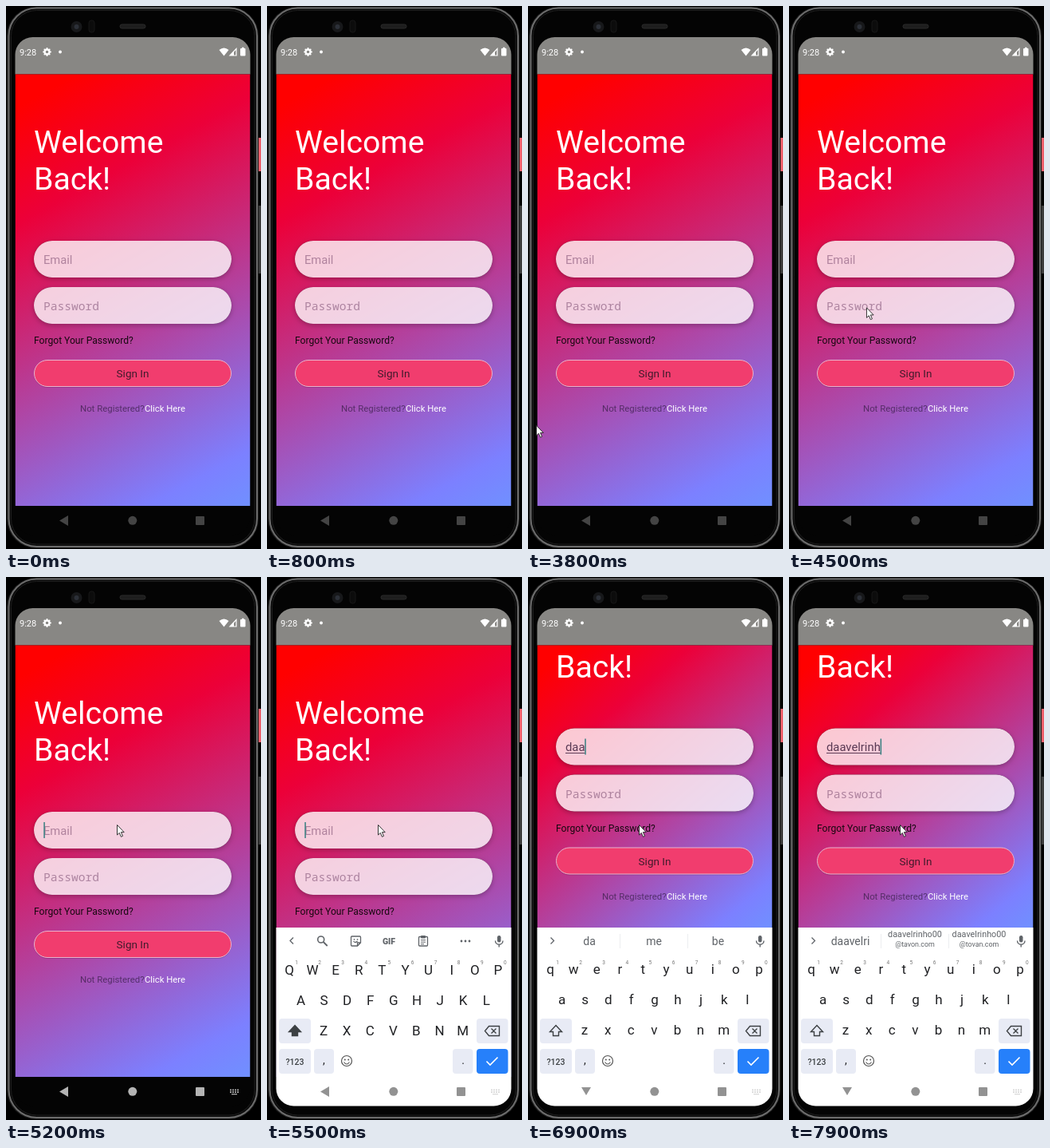
An HTML page with a canvas for the animation above (8000 ms loop, 320x680 px).

```html
<!DOCTYPE html>
<html lang="en">
<head>
<meta charset="utf-8">
<title>Sign in</title>
<style>
html, body { margin: 0; width: 100%; height: 100%; overflow: hidden; background: #000; }
canvas { display: block; width: 320px; height: 680px; }
</style>
</head>
<body>
<canvas id="stage"></canvas>
<script>
const LOOP = 8000;
const canvas = document.getElementById('stage');
const dpr = window.devicePixelRatio || 1;
canvas.width = 320 * dpr;
canvas.height = 680 * dpr;
const c = canvas.getContext('2d');
c.scale(dpr, dpr);

const SANS = 'Roboto, sans-serif';
const MONO = '"Noto Sans Mono", monospace';
const LOGIN = 'daavelrinh';
const TYPED_AT = [6600, 6800, 6900, 7000, 7200, 7400, 7500, 7600, 7800, 7900];
const CLICK = 5100, RESIZE = 5600;
const ICON = '#5f6368';

// Pointer path: time, x, y
const PATH = [[3300, 14, 573], [3600, 10, 546], [3800, 10, 525], [4100, 36, 480],
              [4600, 112, 352], [4900, 139, 310]];

const clamp = v => Math.max(0, Math.min(1, v));
const ease = v => 1 - (1 - clamp(v)) ** 2;

function text(s, x, y, size, color, align = 'left', family = SANS, weight = 400) {
  c.font = `${weight} ${size}px ${family}`;
  c.textAlign = align;
  c.fillStyle = color;
  c.fillText(s, x, y);
}

function box(x, y, w, h, r, fill, stroke, lw = 1) {
  c.beginPath();
  c.roundRect(x, y, w, h, r);
  paint(fill, stroke, lw);
}

function dot(x, y, r, fill, stroke, lw = 1) {
  c.beginPath();
  c.arc(x, y, r, 0, 7);
  paint(fill, stroke, lw);
}

function shape(d, x, y, fill, stroke, lw = 1) {
  c.save();
  c.translate(x, y);
  const p = new Path2D(d);
  if (fill) { c.fillStyle = fill; c.fill(p); }
  if (stroke) { c.strokeStyle = stroke; c.lineWidth = lw; c.stroke(p); }
  c.restore();
}

function paint(fill, stroke, lw) {
  if (fill) { c.fillStyle = fill; c.fill(); }
  if (stroke) { c.strokeStyle = stroke; c.lineWidth = lw; c.stroke(); }
}

function phone() {
  box(316, 165, 5, 42, 1, '#f0606c');
  box(316, 250, 5, 85, 1, '#3c3c3c');
  box(1, 1, 316, 678, 37, '#1c1c1c');
  box(3.5, 2.5, 311.5, 674.5, 35, '#0a0a0a', '#6c6c6c', 2);
  box(6.5, 5.5, 305.5, 668.5, 32, '#040404', '#1e1e1e', 1);
  dot(88.5, 26, 7, '#17181a');
  dot(88.5, 26, 3, '#2c3038');
  box(104, 18, 7, 15, 3, '#0c0c0c', '#161616');
  box(143, 23, 32, 5, 2.5, '#1d1d1d', '#2b2b2b');
}

function statusBar() {
  c.fillStyle = '#888784';
  c.fillRect(11, 39, 296, 46.5);
  text('9:28', 17, 62, 11, '#fff');
  dot(51.5, 57.5, 3, null, '#fff', 2.4);
  for (let i = 0; i < 8; i++) {
    const a = i * Math.PI / 4;
    dot(51.5 + 4.4 * Math.cos(a), 57.5 + 4.4 * Math.sin(a), 1, '#fff');
  }
  dot(68, 57.5, 1.9, '#fff');
  shape('M0 2.5Q6-2.5 12 2.5L6 10Z', 267.5, 52.5, '#fff');
  shape('M1 9.5H9V1Z', 280, 52.5, null, '#fff', 1.2);
  shape('M1 9.5H6V4Z', 280, 52.5, '#fff');
  box(294, 53, 6.5, 9.5, 1, '#fff');
  box(296, 51.7, 2.6, 2, 0, '#fff');
}

function field(y) {
  c.save();
  c.beginPath();
  c.rect(11, 85, 296, 541);
  c.roundRect(35, y, 248, 46, 23);
  c.clip('evenodd');
  c.shadowColor = 'rgba(0,0,0,.26)';
  c.shadowBlur = 6 * dpr;
  c.shadowOffsetY = 2 * dpr;
  box(35, y, 248, 46, 23, '#000');
  c.restore();
  box(35, y, 248, 46, 23, 'rgba(255,255,255,.79)');
}

function form(t, login) {
  const bottom = t < RESIZE ? 626 : 439;
  const g = c.createLinearGradient(12, 85, 306, bottom);
  g.addColorStop(0, '#f00');
  g.addColorStop(.06, '#f00');
  g.addColorStop(.27, '#ec0039');
  g.addColorStop(.9, '#7c80ff');
  g.addColorStop(1, '#7090ff');
  c.save();
  c.beginPath();
  c.rect(11.5, 85.5, 295, bottom - 85.5);
  c.clip();
  c.fillStyle = g;
  c.fillRect(11, 85, 296, 541);
  c.translate(0, -104.5 * ease((t - RESIZE) / 200));

  text('Welcome', 35, 184, 39.2, '#fff');
  text('Back!', 35, 230, 39.2, '#fff');
  field(294);
  field(352);
  const hint = 'rgba(105,55,95,.5)';
  let caretX = 48;
  if (login) {
    text(login, 47, 322.5, 14.8, '#5a3a55');
    const w = c.measureText(login).width;
    c.fillRect(47, 324.5, w, 1);
    caretX = 47.5 + w;
  } else {
    text('Email', 47, 322.5, 14.7, hint);
  }
  text('Password', 47, 381, 14.6, hint, 'left', MONO);
  const blink = Math.floor((t - CLICK) / 500) % 2 === 0;
  if (t >= CLICK && (login || blink)) {
    c.fillStyle = '#367f80';
    c.fillRect(caretX - .7, 307, 1.5, 20);
  }
  text('Forgot Your Password?', 35, 423, 12.1, '#16080f');
  box(35.5, 444.5, 247, 33.5, 17, 'rgba(40,0,30,.2)');
  box(35.5, 443.5, 247, 33, 16.5, '#f13d6e', '#e9b3cd');
  text('Sign In', 159, 465, 13.5, '#401a2c', 'center');
  text('Not Registered?', 93, 508, 11.4, 'rgba(45,25,60,.65)');
  text('Click Here', 174, 508, 11.3, '#fff');
  c.restore();
}

function navBar(color, keys, down) {
  shape(down ? 'M0 0H12L6 10Z' : 'M0 7L11 .5V13.5Z', 67, down ? 639 : 637.5, color);
  dot(158.8, 644.3, 5.5, color);
  box(238, 639, 11, 11, 1, color);
  if (!keys) return;
  for (let i = 0; i < 8; i++) {
    c.fillStyle = keys;
    c.fillRect(281 + i % 4 * 3, 641.5 + (i >> 2) * 2.7, 2, 1.8);
  }
  c.fillRect(283, 647, 7, 1.3);
}

function microphone() {
  box(289, 449, 4.5, 8.5, 2.2, ICON);
  shape('M0 0A4.7 4.7 0 0 0 9.5 0M4.7 5V8', 286.5, 455.5, null, ICON, 1.4);
}

function toolbar() {
  shape('M4 0L0 4L4 8', 29, 451.5, null, ICON, 1.3);
  dot(67.7, 454, 4, null, ICON, 1.6);
  shape('M0 0L5 5', 70.7, 457, null, ICON, 1.8);
  shape('M1 0H11Q12 0 12 1V8L8 12H1Q0 12 0 11V1Q0 0 1 0ZM12 8H8V12M3 6Q5 9 8 6', 105.5, 450, null, ICON, 1.3);
  dot(109.5, 453.8, .9, ICON);
  dot(113.5, 453.8, .9, ICON);
  text('GIF', 153, 459.5, 10.5, ICON, 'center', SANS, 800);
  box(190.5, 450.5, 11, 11.5, 1, null, ICON, 1.3);
  box(193, 449, 6, 3.5, 1, ICON);
  shape('M0 0H6M0 2.5H6M0 5H4', 193, 454.7, null, ICON);
  for (const x of [244, 249, 254]) dot(x, 456, 1.4, ICON);
}

function suggestions(login) {
  shape('M0 0L4 4L0 8', 28.5, 451.5, null, ICON, 1.3);
  c.fillStyle = '#eceef0';
  c.fillRect(115, 447, 1, 18);
  c.fillRect(200, 447, 1, 18);
  const n = login.length;
  const word = n < 4 ? LOGIN.slice(0, Math.min(n, 2)) : LOGIN.slice(0, Math.min(n, 8));
  text(word, 77, 461, 14, ICON, 'center');
  if (n < 4) {
    text('me', 158, 461, 14, ICON, 'center');
    text('be', 238.5, 461, 14, ICON, 'center');
  } else {
    [['@tavon.com', 158], ['@tovan.com', 238.5]].forEach(([host, x]) => {
      text(LOGIN + 'o00', x, 450.5, 10.8, ICON, 'center');
      text(host, x, 463, 8.9, ICON, 'center');
    });
  }
}

function keyboard(t, login) {
  c.fillStyle = '#fff';
  c.fillRect(11, 439, 296, 224);
  login ? suggestions(login) : toolbar();
  microphone();

  const dark = '#202124', pad = '#e8ebf5';
  const rows = [['qwertyuiop', 28, 498], ['asdfghjkl', 42.5, 536], ['zxcvbnm', 71, 574]];
  rows.forEach(([keys, x0, y], r) => [...keys].forEach((k, i) => {
    const x = x0 + i * 29.1;
    text(login ? k : k.toUpperCase(), x, login ? y - 1 : y, 17, dark, 'center');
    if (!r) text((i + 1) % 10, x + 9, 485, 6.5, '#777', 'center');
  }));

  for (const [x, y, w] of [[15, 553, 40], [263, 553, 39.5], [15, 591, 40], [59, 591, 25], [233, 591, 25.5]])
    box(x, y, w, 31, 4, pad);
  shape('M8 0L15.5 8H11.5V13H4.5V8H.5Z', 27, 561.5, login ? null : '#3c4043', '#3c4043', 1.4);
  shape('M5 0H18V12H5L0 6ZM8 3L14 9M14 3L8 9', 273.5, 562.5, null, '#3c4043', 1.4);
  text('?123', 35, 610.5, 10.5, '#3c4043', 'center', SANS, 500);
  text(',', 71.5, 610, 14, dark, 'center');
  text('.', 246, 610, 14, dark, 'center');
  dot(100, 606, 6.5, null, '#555', 1.2);
  dot(97.8, 604.4, 1, '#555');
  dot(102.2, 604.4, 1, '#555');
  shape('M0 0Q3.5 5 7 0', 96.5, 607.5, null, '#555', 1.2);
  box(263, 591, 39.5, 31, 4, '#2680fa');
  shape('M0 4.5L4.5 9L14 -.5', 275.5, 602, null, '#fff', 1.6);
  navBar('#929292', '#dadada', t >= RESIZE + 100);
}

function pointer(t) {
  if (t < PATH[0][0]) return;
  let [, x, y] = PATH[PATH.length - 1];
  const i = PATH.findIndex(p => p[0] > t);
  if (i > 0) {
    const [t0, x0, y0] = PATH[i - 1], [t1, x1, y1] = PATH[i];
    const k = (t - t0) / (t1 - t0);
    x = x0 + (x1 - x0) * k;
    y = y0 + (y1 - y0) * k;
  }
  shape('M.5 .5V13L3.3 10.4L5.4 15.3L7.5 14.4L5.4 9.6H9.2Z', x, y, '#fff', '#222', .9);
}

function draw(t) {
  const login = LOGIN.slice(0, TYPED_AT.filter(at => at <= t).length);
  c.fillStyle = '#000';
  c.fillRect(0, 0, 320, 680);
  phone();
  c.save();
  c.beginPath();
  c.roundRect(11.5, 39, 295, 623.5, 22);
  c.clip();
  c.fillStyle = '#040404';
  c.fillRect(11, 39, 296, 624);
  statusBar();
  form(t, login);
  if (t < CLICK) navBar('#444');
  else navBar('#b4b4b4', '#aaa');
  if (t > 5220) {
    c.translate(0, 223 * (1 - ease((t - 5220) / 230)));
    keyboard(t, login);
  }
  c.restore();
  pointer(t);
}

const start = performance.now();
function tick() {
  draw((performance.now() - start) % LOOP);
  requestAnimationFrame(tick);
}
tick();
</script>
</body>
</html>
```
